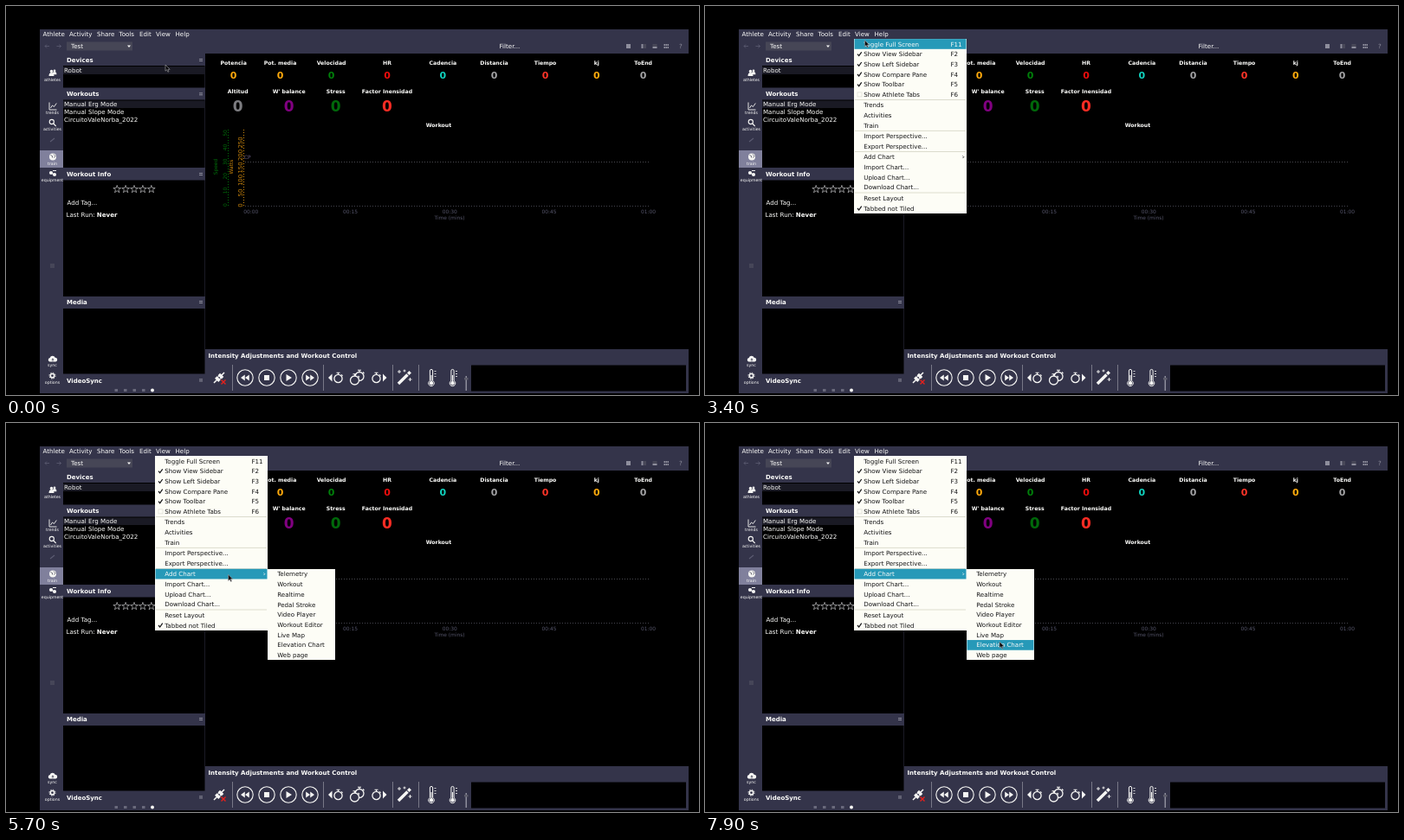
Write an HTML page that moves like this. It is 800x450 px and loops after 8000 ms.

```html
<!DOCTYPE html>
<html lang="en">
<head>
<meta charset="utf-8">
<title>Workout training view</title>
<style>
  html, body { margin: 0; width: 100%; height: 100%; overflow: hidden; background: #000; }
  svg { display: block; width: 800px; height: 450px; }
  text { font: 7.1px "DejaVu Sans", sans-serif; fill: #fcfcfa; white-space: pre; }
  .bold { font-weight: bold; font-size: 7px; }
  .metric { font-weight: bold; font-size: 6.2px; }
  .small { font-size: 4.7px; }
  .axis { font-size: 5.9px; }
  .scale { font-size: 6.9px; }
  .mid { text-anchor: middle; }
  .line { fill: none; stroke: #f6f6f4; stroke-width: 1.1; }
  .solid { fill: #f6f6f4; }
  .menu text { fill: #141416; }
  .menu .on text { fill: #fcfcfa; }
  .bar { fill: #2699b8; visibility: hidden; }
  .on .bar { visibility: visible; }
  .tick { fill: none; stroke: #141416; stroke-width: 1.2; }
  .on .tick { stroke: #fcfcfa; }
</style>
</head>
<body>
<svg id="stage" viewBox="0 0 800 450" xmlns="http://www.w3.org/2000/svg"></svg>
<script>
const PANEL = '#34344a', DIM = '#5e5e74', SOFT = '#8e8e9c', WHITE = '#f6f6f4';
const parts = [];
const add = s => parts.push(s);
const rect = (x, y, w, h, fill, more = '') =>
  `<rect x="${x}" y="${y}" width="${w}" height="${h}" fill="${fill}" ${more}/>`;
const text = (x, y, s, cls = '', more = '') =>
  `<text x="${x}" y="${y}" class="${cls}" ${more}>${s}</text>`;
const path = (d, cls = 'line', more = '') => `<path d="${d}" class="${cls}" ${more}/>`;
const circle = (x, y, r, cls = 'line', more = '') =>
  `<circle cx="${x}" cy="${y}" r="${r}" class="${cls}" ${more}/>`;
const at = (x, y, s, more = '') => `<g transform="translate(${x} ${y}) ${more}">${s}</g>`;
const paint = c => `style="fill:${c}"`;

// Window, menu bar and toolbar
add(rect(39, 27, 749, 421, PANEL));
[['Athlete', 42.5], ['Activity', 73], ['Share', 105], ['Tools', 130.5],
 ['Edit', 154], ['View', 173], ['Help', 195.5]].forEach(([s, x]) => add(text(x, 35.4, s)));
add(rect(70, 41.5, 76, 10, '#464656'));
add(text(75, 49.2, 'Test'));
add(path('M140 45.5h4l-2 2.5z', 'solid'));
add(path('M50 46.5h-5m2-2l-2 2l2 2M58.5 46.5h5m-2-2l2 2l-2 2', 'line', `style="stroke:${DIM};stroke-width:.8"`));
add(text(569.5, 49.2, 'Filter...'));
add(rect(716, 44, 5, 5, SOFT));
add(rect(733.5, 44, 2, 5, SOFT) + rect(736, 44, 3, 5, '#484858'));
add(rect(746.5, 44, 5, 3, '#484858') + rect(746.5, 47, 5, 2, SOFT));
for (let i = 0; i < 6; i++) {
  add(rect(759.5 + i % 3 * 2, 44 + (i / 3 | 0) * 3, 1.5, 2, SOFT));
}
add(text(777, 49, '?', '', paint(SOFT)));

// View sidebar
add(rect(39, 167, 27, 20, '#80809c'));
[['athletes', 86.6], ['trends', 124.8], ['activities', 144.4], ['train', 183.6],
 ['equipment', 203], ['sync', 416.8], ['options', 437]]
  .forEach(([s, y]) => add(text(53.5, y, s, 'small mid')));
const person = circle(0, -2, 1.7, 'solid') + path('M-3 3.5q0-4 3-4t3 4z', 'solid');
add(at(56, 76.5, person, 'scale(.8)') + at(52.5, 77.5, person));
add(path('M50 111.5v8.5h8.5M51.5 118l2-3 2 1.5 2.8-4', 'line', 'style="stroke-width:.9"'));
add(circle(52.8, 134, 2.6) + path('M54.7 136l3 3'));
add(path('M51 157l5-4', 'line', `style="stroke:${DIM}"`));
add(circle(54, 174.5, 4, 'solid') +
    path('M51.5 172.5l2 1v2M55 171.5l2 2-1.5 2', 'line', 'style="stroke:#62626e;stroke-width:.9"'));
add(circle(52, 193, 2.1, 'solid') + circle(56, 195, 2.1, 'solid') + path('M52 193l4 2M54 190.5h4'));
add(rect(51, 298, 5, 5, '#464658'));
add(path('M50.5 411.5a2.3 2.3 0 0 1 .2-4.5a3.2 3.2 0 0 1 6-.2a2.4 2.4 0 0 1 .8 4.7z', 'solid') +
    path('M54 411v-3m-1.3 1.2l1.3-1.3l1.3 1.3', 'line', `style="stroke:${PANEL};stroke-width:.8"`));
add(circle(53.5, 427.7, 2.2, 'line', 'style="stroke-width:1.6"') +
    circle(53.5, 427.7, 3.5, 'line', 'style="stroke-width:1;stroke-dasharray:1.4 1.35"'));

// Left panels
const panel = (title, y, top, bottom) => {
  add(rect(66, top, 163.5, bottom - top, '#000'));
  add(text(70, y + 2.6, title, 'bold'));
  add(rect(223, y - 1.5, 4, 1, SOFT) + rect(223, y + .5, 4, 1, SOFT));
};
panel('Devices', 62.5, 69, 94.5);
panel('Workouts', 101.8, 108.5, 187);
panel('Workout Info', 194.5, 201.5, 336);
panel('Media', 342.5, 350, 425.5);
panel('VideoSync', 432.9, 440, 440);
add(rect(66, 70, 163.5, 9, '#1a1a24') + rect(66, 109.5, 163.5, 8.5, '#1a1a24'));
[['Robot', 77], ['Manual Erg Mode', 116.3], ['Manual Slope Mode', 124.8],
 ['CircuitoValeNorba_2022', 133.5]].forEach(([s, y]) => add(text(67, y, s)));
const star = Array.from({ length: 10 }, (_, i) => {
  const a = i * Math.PI / 5 - Math.PI / 2, r = i % 2 ? 1.8 : 4.6;
  return `${(r * Math.cos(a)).toFixed(2)},${(r * Math.sin(a)).toFixed(2)}`;
}).join(' ');
for (let i = 0; i < 5; i++) {
  add(at(128.2 + i * 9.9, 212, `<polygon points="${star}" class="line" style="stroke:#c4c4c8;stroke-width:.7"/>`));
}
add(text(70.5, 230, 'Add Tag...'));
add(text(69.5, 243.6, 'Last Run: <tspan font-weight="bold">Never</tspan>'));
for (let i = 0; i < 5; i++) {
  add(i < 4 ? rect(125.5 + i * 10.5, 443, 3.5, 3, '#6a6a7c') : circle(169, 444.4, 2, 'solid'));
}

// Metrics
add(rect(230, 55, 558, 342, '#000'));
const metric = (y, valueY, size) => ([label, x, color]) => {
  add(text(x, y, label, 'metric mid'));
  add(text(x, valueY, '0', 'mid', `style="font-weight:bold;font-size:${size}px;fill:${color}"`));
};
[['Potencia', 262.7, '#ffaa0c'], ['Pot. media', 316.5, '#ffaa0c'], ['Velocidad', 375.6, '#00800a'],
 ['HR', 440, '#f00c0c'], ['Cadencia', 504.4, '#10d4c0'], ['Distancia', 563.5, '#a2a2a4'],
 ['Tiempo', 622.5, '#ff3428'], ['kj', 681.8, '#ffaa0c'], ['ToEnd', 735.7, '#a4a4a6']]
  .forEach(metric(68.2, 84, 11));
[['Altitud', 267.7, '#7c7c80'], ["W' balance", 326.7, '#800080'],
 ['Stress', 380.7, '#00680a'], ['Factor Inensidad', 440, '#ff2c24']]
  .forEach(metric(101, 122.3, 17));

// Workout plot
add(text(499.5, 140.2, 'Workout', 'metric mid'));
const upright = (x, y, s, color, cls) =>
  add(text(0, 0, s, `${cls} mid`, `transform="translate(${x} ${y}) rotate(-90)" ${paint(color)}`));
const GREEN = '#00700a', AMBER = '#cc860c', GREY = '#56566c';
upright(244, 186, 'Speed', GREEN, 'axis');
upright(261.5, 186, 'Watts', AMBER, 'axis');
for (let i = 0; i < 6; i++) {
  upright(254.5, 230 - i * 16.6, i * 10, GREEN, 'axis');
  upright(272.5, 230.5 - i * 14.5, i * 50, AMBER, 'scale');
}
const rule = (d, color, dash) =>
  add(path(d, 'line', `style="stroke:${color};stroke-width:1;stroke-dasharray:${dash}"`));
rule('M256.5 143V232', GREEN, '1 2');
rule('M274.5 143V232', AMBER, '1 2');
rule('M276 180.5H742', '#4a4a50', '1 2');
rule('M276 231.5H742', '#44444e', '1 2');
add(text(275, 176.5, 'CP', 'axis', paint('#6a5c80')));
['00:00', '00:15', '00:30', '00:45', '01:00']
  .forEach((s, i) => add(text(282.8 + i * 114.7, 240, s, 'axis mid', paint(GREY))));
add(text(512, 247.3, 'Time (mins)', 'axis mid', paint(GREY)));

// Workout controls
add(text(233.5, 406.7, 'Intensity Adjustments and Workout Control', 'bold'));
[261, 366, 446, 476].forEach(x => add(rect(x, 415, .8, 30, '#8a8a96')));
add(at(246, 430,
  path('M-8.5 0h5M3.5 0h5', 'line', 'style="stroke-width:1.5"') +
  rect(-4, -3, 3.5, 6, WHITE) + rect(1, -3, 3.5, 6, WHITE) + path('M-1 -1.5h3M-1 1.5h3'),
  'rotate(-45)'));
add(path('M248.5 432.5l5 5m0-5l-5 5', 'line', 'style="stroke:#e8201c;stroke-width:1.4"'));
const button = (x, glyph) => add(at(x, 430, circle(0, 0, 9.2) + glyph));
const skip = path('M-5 0l4.8-3.5v7zM0 0l4.8-3.5v7z', 'solid');
button(276, skip);
button(301, rect(-3, -3, 6, 6, WHITE));
button(326, path('M-2.5-4l6.5 4l-6.5 4z', 'solid'));
button(351, `<g transform="scale(-1 1)">${skip}</g>`);
const watch = (x, y, r = 4.6) => at(x, y,
  circle(0, 0, r, 'line', `style="fill:${PANEL};stroke-width:1.3"`) +
  path(`M-2 ${-r - 2.2}h4M0 ${-r - 2}v2M${r - 1} ${-r}l1.5 1.5`));
add(path('M372 430l4.5-4.5v9z', 'solid') + watch(383.5, 431));
add(watch(408, 428.5, 5) + watch(402.5, 433, 5));
add(watch(427.5, 431) + path('M439.5 430l-4.5-4.5v9z', 'solid'));
add(at(460, 430, rect(-10, -1.7, 15, 3.4, WHITE) + rect(6, -1.7, 3.5, 3.4, WHITE), 'rotate(-45)'));
add(path('M454 421v4m-2-2h4M460 420.5v3m-1.5-1.5h3M466.5 430v4m-2-2h4', 'line', 'style="stroke-width:.9"'));
const thermometer = x => add(at(x, 430,
  path('M-1.6 3.5V-8a1.6 1.6 0 0 1 3.2 0V3.5a3.3 3.3 0 1 1-3.2 0z', 'line', 'style="stroke-width:1"') +
  circle(0, 6.3, 2.2, 'solid') + path('M0 6V-3') +
  path('M3.5 -7.5h2M3.5 -4.5h2M3.5 -1.5h2', 'line', 'style="stroke-width:.8"')));
thermometer(491);
thermometer(515.5);
add(rect(530.5, 428, 1.5, 17, SOFT) + rect(529, 430, 4.5, 2.5, '#5c5c6a'));
add(rect(537, 415.5, 248, 30, '#000'));

// Drop-down menus
const PAPER = '#fdfdf6';
const item = (x, w, y, label, more = '') =>
  `<g data-y="${y}">${rect(x, y - 5.9, w, 11.7, '', 'class="bar"')}${more}` +
  `${text(x + 10.7, y + 2.5, label)}</g>`;
const viewItems = [
  ['Toggle Full Screen', 44, 'F11'], ['Show View Sidebar', 55.6, 'F2', 1], ['Show Left Sidebar', 67.3, 'F3', 1],
  ['Show Compare Pane', 79, 'F4', 1], ['Show Toolbar', 90.7, 'F5', 1], ['Show Athlete Tabs', 102.4, 'F6'],
  ['Trends', 114.7], ['Activities', 126.4], ['Train', 138.1],
  ['Import Perspective...', 150.5], ['Export Perspective...', 162.2],
  ['Add Chart', 174.7], ['Import Chart...', 186.4], ['Upload Chart...', 198.1], ['Download Chart...', 209.8],
  ['Reset Layout', 222.3], ['Tabbed not Tiled', 234, '', 1]];
const ADD_CHART = 11;
const chartItems = ['Telemetry', 'Workout', 'Realtime', 'Pedal Stroke', 'Video Player',
  'Workout Editor', 'Live Map', 'Elevation Chart', 'Web page'];

add('<g id="view" class="menu">' + rect(172, 38, 130, 202, PAPER));
[108.5, 144.3, 168.4, 216].forEach(y => add(rect(173, y - .4, 128, .8, '#d4d4c4')));
viewItems.forEach(([label, y, key = '', checked], i) => {
  let more = key && text(283.5, y + 2.5, key);
  if (checked) more += path(`M176 ${y}l1.7 2l3-4.3`, 'tick');
  if (i === 5) more += rect(176, y - 2.5, 5, 5, 'none', 'stroke="#dcdcd4" stroke-width=".7"');
  if (i === ADD_CHART) more += path(`M297.5 ${y - 1.3}l1.3 1.3l-1.3 1.3`, 'tick', 'style="stroke-width:.8"');
  add(item(172.5, 129, y, label, more));
});
add('</g><g id="chart" class="menu">' + rect(302, 169, 78, 105, PAPER));
chartItems.forEach((label, i) => add(item(302.5, 77, +(174.9 + i * 11.72).toFixed(2), label)));
add('</g>');
add('<path id="cursor" d="M0 0V7.2L1.7 5.7L2.9 8.3L4 7.8L2.9 5.3H5.2Z" fill="#0a0a0c" stroke="#a8a8ac" stroke-width=".6"/>');

const stage = document.getElementById('stage');
stage.innerHTML = parts.join('');

const LOOP = 8000, STEP = 100, VIEW_OPENS = 2600, CHART_OPENS = 5400;
const track = [
  [0, 184, 68], [600, 184, 68], [1800, 178, 38], [2100, 178, 37], [2600, 179, 34],
  [3200, 184, 39.5], [3700, 185, 40], [4300, 216, 118], [4500, 224, 136], [4800, 233, 163],
  [5100, 238, 173], [5500, 240, 175], [6200, 298, 176], [6400, 312, 177], [6700, 326, 187],
  [7100, 328, 190], [7900, 340, 253]];

const pointer = t => {
  const i = track.findIndex(p => p[0] > t);
  if (i < 0) return track[track.length - 1].slice(1);
  const [t0, x0, y0] = track[i - 1], [t1, x1, y1] = track[i];
  const k = (t - t0) / (t1 - t0);
  return [x0 + (x1 - x0) * k, y0 + (y1 - y0) * k];
};

const [view, chart, cursor] = ['view', 'chart', 'cursor'].map(id => document.getElementById(id));
const rows = menu => [...menu.querySelectorAll('g[data-y]')];
const viewRows = rows(view), chartRows = rows(chart);
const hovered = (list, y) => list.findIndex(g => Math.abs(g.dataset.y - y) < 6.1);
const mark = (list, active) => list.forEach((g, i) => g.classList.toggle('on', i === active));
const show = (el, on) => { el.style.display = on ? '' : 'none'; };

function draw(now) {
  const t = Math.floor(now % LOOP / STEP) * STEP;
  const [x, y] = pointer(t);
  const inChart = x >= 302;
  show(view, t >= VIEW_OPENS);
  show(chart, t >= CHART_OPENS);
  mark(viewRows, inChart ? ADD_CHART : hovered(viewRows, y));
  mark(chartRows, inChart ? hovered(chartRows, y) : -1);
  cursor.setAttribute('transform', `translate(${x} ${y})`);
}

const start = performance.now();
function tick() {
  draw(performance.now() - start);
  requestAnimationFrame(tick);
}
tick();
</script>
</body>
</html>
```
